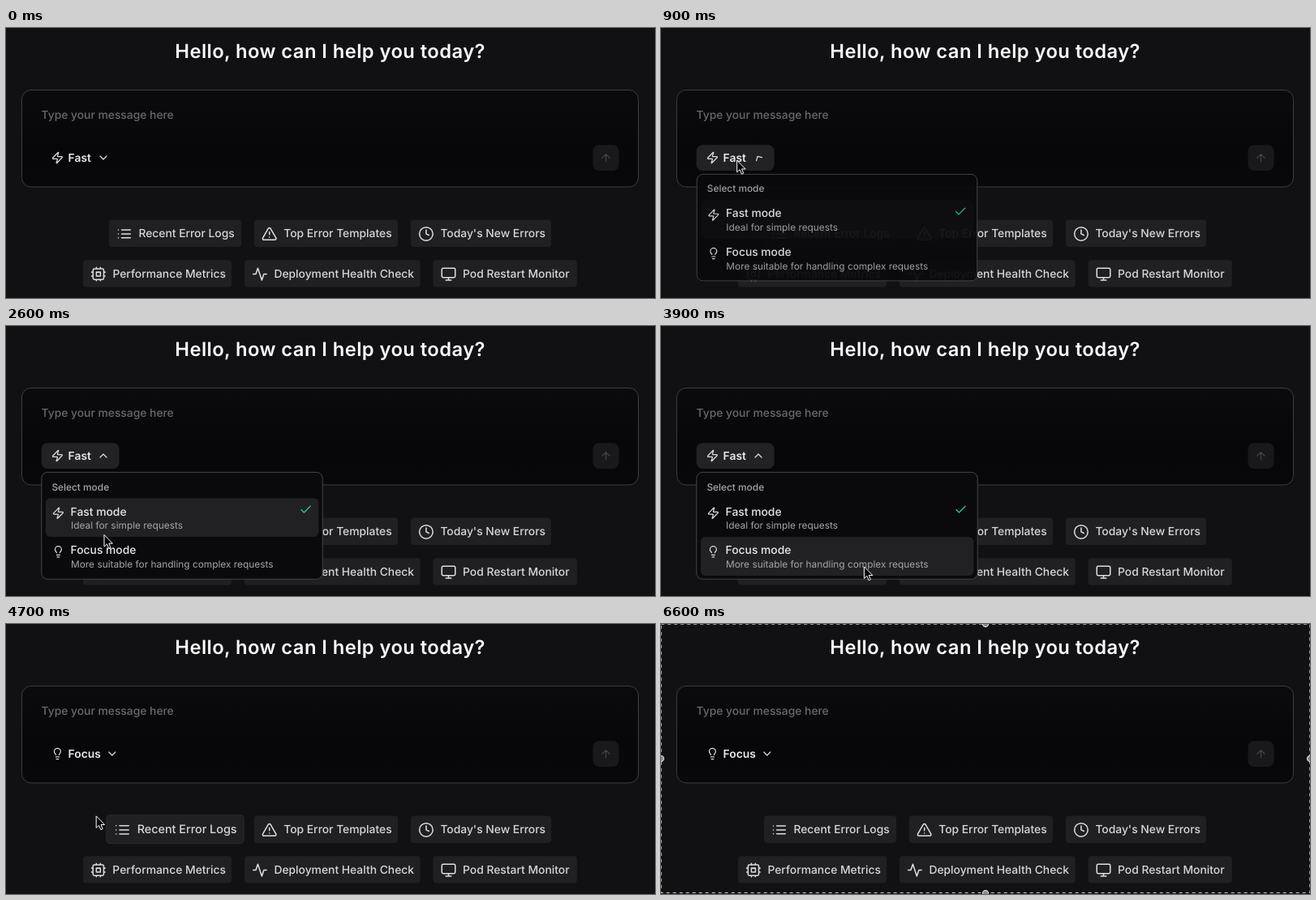
Animation, 800 px wide and 333 px high, one loop 7000 ms. Source, as an HTML page:

```html
<!DOCTYPE html>
<html lang="en">
<head>
<meta charset="utf-8">
<title>Mode selector</title>
<style>
  html, body { margin: 0; width: 100%; height: 100%; overflow: hidden; background: #111113; }
  svg { display: block; width: 100%; height: 100%; }
  text { font: 500 13.85px Inter, sans-serif; font-optical-sizing: none; text-rendering: geometricPrecision; fill: #e8e8ea; white-space: pre; }
  .title { font-size: 23.78px; font-weight: 600; letter-spacing: .018em; fill: #fafafa; text-anchor: middle; }
  .hint { fill: #69696e; }
  .label { font-weight: 600; }
  .chip text { fill: #d8d8da; }
  .small { font-size: 11.89px; fill: #a5a5aa; }
  .sub { font-weight: 400; }
  .icon { fill: none; stroke: #dededf; stroke-width: 1.85; stroke-linecap: round; stroke-linejoin: round; }
</style>
</head>
<body>
<svg id="stage" viewBox="0 0 800 333">
  <defs>
    <linearGradient id="panel" x2="0" y2="1">
      <stop stop-color="#0b0b0d"/><stop offset=".6" stop-color="#07070a"/><stop offset="1" stop-color="#08080b"/>
    </linearGradient>
  </defs>
  <rect width="800" height="333" fill="#111113"/>
  <text class="title" x="399.6" y="36.8">Hello, how can I help you today?</text>
  <rect x="19.5" y="76.5" width="760" height="119.5" rx="11.4" fill="url(#panel)" stroke="#3e3e41"/>
  <text class="hint" x="43.5" y="111.8">Type your message here</text>
  <rect x="723.5" y="144.2" width="32" height="31.7" rx="7.5" fill="#19191c"/>
  <g id="send"></g>
  <g id="chips"></g>
  <rect id="modeBg" x="43.6" y="144.2" height="31.7" rx="7.5" fill="#222225"/>
  <g id="modeZap"></g>
  <g id="modeBulb"></g>
  <text id="modeLabel" class="label" x="76.6" y="165"></text>
  <g id="chevron"></g>
  <g id="menu">
    <rect x="43.8" y="180.4" width="346.4" height="131.8" rx="7.5" fill="#0a0a0d" stroke="#454548"/>
    <rect id="fastBg" x="48.8" y="212.3" width="336.6" height="47.7" rx="6" fill="#212124"/>
    <rect id="focusBg" x="48.8" y="260.2" width="336.6" height="47.7" rx="6" fill="#212124"/>
    <text class="small" x="56.4" y="202.5">Select mode</text>
    <text x="79.6" y="233.6">Fast mode</text>
    <text class="small sub" x="80" y="250.2">Ideal for simple requests</text>
    <text x="79.6" y="281.2">Focus mode</text>
    <text class="small sub" x="80" y="298">More suitable for handling complex requests</text>
    <g id="menuIcons"></g>
  </g>
  <g id="marquee"></g>
  <g id="cursor">
    <path id="arrow" d="M0 0V14.6L3.4 11.5 5.7 16.9 8 15.9 5.8 10.7H10.4Z" fill="#000" stroke="#fff" stroke-linejoin="round"/>
    <path id="hand" d="M-1.6 9.6V1.6Q-1.6 .2-.3 .2T1 1.6V5.6Q2.2 4.6 3.4 5.9 4.8 5.1 5.7 6.4 7.9 5.9 7.9 8.4V11.5Q7.9 13.6 6.6 15.2V17H-.4V15.6Q-2.6 13-4.4 10.2-5 8.6-3.7 8.4-2.7 8.5-1.6 9.6ZM1.6 10.5V14M3.8 10.5V14M5.8 10.5V14" fill="#fff" stroke="#000" stroke-width=".9" stroke-linejoin="round"/>
  </g>
</svg>
<script>
const LOOP = 7000, STEP = 100;
const $ = id => document.getElementById(id);

const ICONS = {
  zap: 'M4 14a1 1 0 0 1-.78-1.63l9.9-10.2a.5.5 0 0 1 .86.46l-1.92 6.02A1 1 0 0 0 13 10h7a1 1 0 0 1 .78 1.63l-9.9 10.2a.5.5 0 0 1-.86-.46l1.92-6.02A1 1 0 0 0 11 14z',
  bulb: 'M15 14c.2-1 .7-1.7 1.5-2.5 1-.9 1.5-2.2 1.5-3.5A6 6 0 0 0 6 8c0 1 .2 2.2 1.5 3.5.7.7 1.3 1.5 1.5 2.5M9 18h6M10 22h4',
  up: 'M5 12l7-7 7 7M12 19V5',
  down: 'M6 9l6 6 6-6',
  check: 'M20 6L9 17l-5-5',
  list: 'M3 6h.01M3 12h.01M3 18h.01M8 6h13M8 12h13M8 18h13',
  alert: 'M21.7 18l-8-14a2 2 0 0 0-3.5 0l-8 14A2 2 0 0 0 4 21h16a2 2 0 0 0 1.7-3M12 9v4M12 17h.01',
  clock: 'M2 12a10 10 0 1 0 20 0a10 10 0 1 0-20 0M12 6v6l4 2',
  cpu: 'M6 4h12a2 2 0 0 1 2 2v12a2 2 0 0 1-2 2H6a2 2 0 0 1-2-2V6a2 2 0 0 1 2-2zM9 9h6v6H9zM9 2v2M15 2v2M9 20v2M15 20v2M2 9h2M2 15h2M20 9h2M20 15h2',
  pulse: 'M22 12h-4l-3 9L9 3l-3 9H2',
  monitor: 'M4 3h16a2 2 0 0 1 2 2v10a2 2 0 0 1-2 2H4a2 2 0 0 1-2-2V5a2 2 0 0 1 2-2zM8 21h8M12 17v4'
};

const icon = (name, x, y, size = 15.9, color = '#dededf') =>
  `<path class="icon" style="stroke:${color}" d="${ICONS[name]}" transform="translate(${x} ${y}) scale(${size / 24}) translate(-12 -12)"/>`;

const CHIPS = [
  ['list', 'Recent Error Logs', 127, 236.5, 163],
  ['alert', 'Top Error Templates', 305.8, 236.5, 177.2],
  ['clock', "Today's New Errors", 499, 236.5, 173],
  ['cpu', 'Performance Metrics', 95, 286.2, 183],
  ['pulse', 'Deployment Health Check', 294, 286.2, 216.6],
  ['monitor', 'Pod Restart Monitor', 526.6, 286.2, 177.2]
];

$('chips').innerHTML = CHIPS.map(([name, label, x, y, w]) => `<g class="chip">
  <rect x="${x}" y="${y}" width="${w}" height="33.4" rx="4" fill="#202023" stroke="#2f2f33" stroke-opacity="0"/>
  ${icon(name, x + 18.9, y + 17.4, 19.8)}<text x="${x + 36.4}" y="${y + 21.8}">${label}</text></g>`).join('');
$('send').innerHTML = icon('up', 739.5, 160.2, 15.9, '#434347');
$('modeZap').innerHTML = icon('zap', 63.4, 160);
$('modeBulb').innerHTML = icon('bulb', 63.4, 160);
$('chevron').innerHTML = icon('down', 0, 0);
$('menuIcons').innerHTML = icon('zap', 64.4, 230.7) + icon('bulb', 64.4, 278.3) + icon('check', 369.5, 226.5, 17, '#2fc98c');

const handles = [[400, 0], [0, 166], [800, 166], [400, 332]];
$('marquee').innerHTML = ['stroke="#111"', 'stroke="#d0d0d0" stroke-dasharray="4 4"']
  .map(line => `<rect x=".2" y=".2" width="799.6" height="331.3" fill="none" ${line}/>`).join('') +
  handles.map(([x, y]) => `<circle cx="${x}" cy="${y}" r="3.6" fill="#8a8a8c" stroke="#eee"/>`).join('');

// Pointer path: time, x, y
const PATH = [
  [400, 93.7, 163.2], [1700, 93.7, 163.2], [1900, 97, 180], [2200, 110, 225], [2500, 119, 250],
  [2600, 121, 257.5], [2800, 116, 277], [3000, 130, 290], [3300, 240, 297], [3400, 250.4, 296.8],
  [4400, 250.4, 296.8], [4500, 238, 290], [4600, 172, 262], [4700, 111.2, 236.8]
];

function pointer(t) {
  const i = PATH.findIndex(p => p[0] >= t);
  if (i < 1) return PATH[0].slice(1);
  const [a, b] = [PATH[i - 1], PATH[i]];
  const k = (t - a[0]) / (b[0] - a[0]);
  return [1, 2].map(n => a[n] + (b[n] - a[n]) * k);
}

// cubic-bezier(.4, 0, .2, 1)
function ease(x) {
  let lo = 0, hi = 1, u = .5;
  for (let i = 0; i < 16; i++) {
    u = (lo + hi) / 2;
    const v = 1 - u;
    if (1.2 * v * v * u + .6 * v * u * u + u ** 3 < x) lo = u; else hi = u;
  }
  return 3 * (1 - u) * u * u + u ** 3;
}

const ramp = (t, start, length) => {
  const p = Math.min(1, Math.max(0, (t - start) / length));
  return p === 0 || p === 1 ? p : ease(p);
};
const pulse = (t, on, off, length) => ramp(Math.min(t, off), on, length) * (1 - ramp(t, off, length));
const show = (id, on) => $(id).setAttribute('visibility', on ? 'visible' : 'hidden');
const opacity = (id, value) => $(id).setAttribute('opacity', value);
const chipNodes = [...document.querySelectorAll('.chip')];

function hoverChip(index, k) {
  const [, , x, y, w] = CHIPS[index], cx = x + w / 2, cy = y + 16.7;
  chipNodes[index].setAttribute('transform', `translate(${cx} ${cy}) scale(${1 + .05 * k}) translate(${-cx} ${-cy})`);
  chipNodes[index].firstElementChild.setAttribute('stroke-opacity', k);
}

function render(t) {
  const focus = t > 3900;
  show('modeZap', !focus);
  show('modeBulb', focus);
  $('modeLabel').textContent = focus ? 'Focus' : 'Fast';
  $('modeBg').setAttribute('width', focus ? 107 : 96);
  opacity('modeBg', pulse(t, 390, 3910, 200));
  $('chevron').setAttribute('transform', `translate(${focus ? 130.8 : 120} 160) rotate(${180 * pulse(t, 790, 3910, 200)})`);

  const open = pulse(t, 785, 3910, 160);
  opacity('menu', open);
  $('menu').setAttribute('transform', `translate(217 180) scale(${.95 + .05 * open}) translate(-217 -180)`);
  opacity('fastBg', pulse(t, 865, 2620, 150));
  opacity('focusBg', ramp(t, 2620, 150));

  hoverChip(3, pulse(t, 4080, 4530, 200));
  hoverChip(0, pulse(t, 4600, 4700, 200));

  const hand = t >= 4100 && t < 4700;
  show('cursor', t >= 400 && t < 4800);
  opacity('arrow', hand ? 0 : 1);
  opacity('hand', hand ? 1 : 0);
  $('cursor').setAttribute('transform', `translate(${pointer(t)})`);
  show('marquee', t >= 5700);
}

const start = performance.now();
function tick() {
  const t = (performance.now() - start) % LOOP;
  render(Math.floor(t / STEP) * STEP);
  requestAnimationFrame(tick);
}
tick();
</script>
</body>
</html>
```
